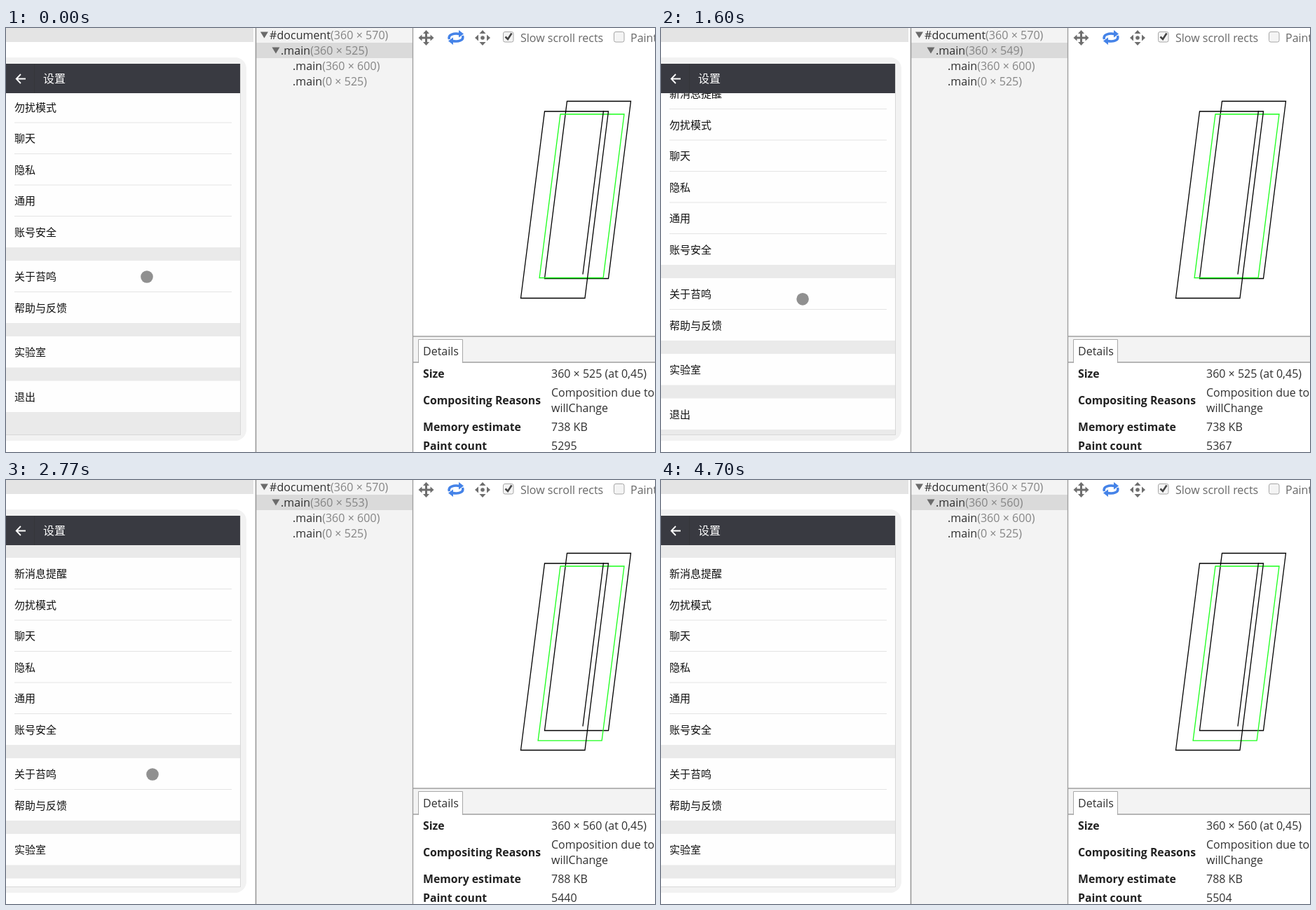
Recreate the animation shown at these times as an HTML page. Size 926 by 605 pixels, loop 5100 ms.

```html
<!DOCTYPE html>
<html lang="zh">
<head>
<meta charset="utf-8">
<title>Settings scroll and layer panel</title>
<style>
  html, body { margin: 0; width: 100%; height: 100%; overflow: hidden; background: #fff; }
  svg { display: block; }
  text { font: 16px "Open Sans", "Noto Sans", sans-serif; fill: #303030; white-space: pre; }
  .cjk text, text.cjk { font: 15px "Noto Sans CJK SC", "Noto Sans CJK", sans-serif; fill: #111; }
  text.title { font-size: 16px; fill: #fff; }
  .tree text { font-size: 16.1px; }
  .tree tspan { fill: #858585; }
  .tool text { fill: #686868; }
  .label text { font-size: 15.8px; font-weight: 700; fill: #222; }
  .layers { fill: none; stroke: #000; stroke-width: 1.3; }
</style>
</head>
<body>
<svg width="926" height="605" viewBox="0 0 926 605">
  <defs>
    <clipPath id="view"><rect y="93" width="334" height="487"/></clipPath>
    <path id="head" d="M0 -11L4.5 -6H-4.5Z"/>
  </defs>

  <!-- phone -->
  <rect width="353" height="20" fill="#e4e4e4"/>
  <rect x="-30" y="42" width="373" height="547" rx="16" fill="#f2f2f2"/>
  <rect y="51" width="335" height="530" fill="#d8d8d8"/>
  <rect y="93" width="334" height="487" fill="#eaeaea"/>
  <g clip-path="url(#view)"><g id="list" class="cjk"></g></g>
  <rect y="51" width="334" height="42" fill="#393a41"/>
  <path d="M40.5 51V93" stroke="#34353a"/>
  <path d="M28 72.5H15M21 66L14.7 72.5L21 79" fill="none" stroke="#fff" stroke-width="1.8"/>
  <text class="cjk title" x="53" y="78">设置</text>
  <circle id="finger" r="8.8" fill="#909090"/>

  <!-- layer tree -->
  <rect x="356" width="225" height="605" fill="#f3f3f3"/>
  <rect x="357" y="21" width="223" height="22" fill="#dadada"/>
  <path d="M356.5 0V605" stroke="#999" stroke-width="1.6"/>
  <path d="M363 5.500H374L368.500 14.500ZM379.500 27.500H390.500L385 36.500Z" fill="#6b6b6b"/>
  <g class="tree">
    <text x="376" y="15.5">#document<tspan>(360 × 570)</tspan></text>
    <text x="392" y="38">.main<tspan id="node"></tspan></text>
    <text x="409" y="60">.main<tspan>(360 × 600)</tspan></text>
    <text x="409" y="82">.main<tspan>(0 × 525)</tspan></text>
  </g>

  <!-- toolbar -->
  <rect x="581" width="345" height="440" fill="#fff"/>
  <g fill="#6e6e6e">
    <g transform="translate(599.500 14)">
      <path d="M-8 0H8M0 -8V8" stroke="#6e6e6e" stroke-width="3"/>
      <use href="#head"/><use href="#head" transform="rotate(90)"/>
      <use href="#head" transform="rotate(180)"/><use href="#head" transform="rotate(270)"/>
    </g>
    <g transform="translate(680 14)">
      <circle r="2.8"/>
      <use href="#head"/><use href="#head" transform="rotate(90)"/>
      <use href="#head" transform="rotate(180)"/><use href="#head" transform="rotate(270)"/>
    </g>
  </g>
  <g fill="none" stroke="#4583e8" stroke-width="3.500">
    <path d="M632.500 16C630 9 640 7 647 8.500M651.500 11C654 18 645 20 637 18.500"/>
    <path d="M646 3L653 8.500L646 13.500ZM638 13.500L631 18.500L638 24Z" fill="#4583e8" stroke="none"/>
  </g>
  <g fill="#f4f4f4" stroke="#a6a6a6">
    <rect x="709.5" y="5.500" width="14.500" height="14.500" rx="2.500"/>
    <rect x="867.5" y="5.500" width="14.500" height="14.500" rx="2.500"/>
    <path d="M712.500 12.500L716 16L721.500 7.500" fill="none" stroke="#444" stroke-width="2.500"/>
  </g>
  <g class="tool">
    <text x="734" y="19.500">Slow scroll rects</text>
    <text x="891" y="19.500">Paint</text>
  </g>

  <!-- layer outlines -->
  <g class="layers">
    <path d="M800.500 104.500H891.500L859.500 357.500H768.500Z"/>
    <path id="layer" stroke="#1aff1a"/>
    <path d="M768.500 119H859.500L826 385.500H734.500ZM852.500 118L823 351.500"/>
  </g>

  <!-- details -->
  <rect x="581" y="440" width="345" height="37" fill="#f3f3f3"/>
  <rect x="581" y="477" width="345" height="128" fill="#fff"/>
  <path d="M580.500 0V605M581 440H926M581 477H926" stroke="#a0a0a0" stroke-width="1.4"/>
  <path d="M588.500 478V444.500H651.500V478" fill="#fff" stroke="#a8a8a8"/>
  <text x="595" y="466.500">Details</text>
  <g class="label">
    <text x="595" y="499">Size</text>
    <text x="595" y="537">Compositing Reasons</text>
    <text x="595" y="575">Memory estimate</text>
    <text x="595" y="602">Paint count</text>
  </g>
  <text id="size" x="778" y="499"></text>
  <text x="778" y="526">Composition due to</text>
  <text x="778" y="548">willChange</text>
  <text id="memory" x="778" y="575"></text>
  <text id="paint" x="778" y="602"></text>
</svg>

<script>
const $ = id => document.getElementById(id);
const LOOP = 5100, SCALE = 0.93, ROW = 44.5, GAP = 19, TREE_LAG = 140;

const groups = [
  ["新消息提醒", "勿扰模式", "聊天", "隐私", "通用", "账号安全"],
  ["关于苔鸣", "帮助与反馈"], ["实验室"], ["退出"]
];

// drag bursts: start, end, number of picture changes
const bursts = [[60, 330, 6], [540, 1060, 11], [1370, 1810, 10], [1900, 2420, 10],
  [2470, 2770, 7], [2990, 3480, 11], [3790, 4310, 11]];

// time, scroll offset, finger x, finger y, paint count
const keys = [
  [0, -65, 201, 355, 5295], [60, -67, 201, 352, 5298], [114, -70, 201, 349, 5301],
  [330, -70, 201, 345, 5311], [540, -68, 201, 347, 5313], [900, 0, 201, 416, 5333],
  [1060, 0, 201, 432, 5341], [1370, 0, 201, 432, 5341], [1712, -70, 203, 353, 5386],
  [1810, -70, 204, 346, 5389], [1900, -70, 205, 347, 5391], [2304, -35, 208, 381, 5403],
  [2420, -15, 208, 401, 5410], [2470, -12, 208, 404, 5413], [2770, 0, 209, 420, 5440],
  [2990, -13, 209, 407, 5445], [3235, -53, 211, 365, 5460], [3333, -70, 211, 350, 5465],
  [3480, -70, 212, 347, 5479], [3790, -68, 212, 350, 5484], [3894, -38, 213, 381, 5490],
  [4100, 0, 213, 420, 5498], [4310, 0, 213, 430, 5504]
];

function buildList() {
  let y = 111, html = "";
  for (const names of groups) {
    html += `<rect y="${y}" width="334" height="${names.length * ROW}" fill="#fefefe"/>`;
    names.forEach((name, i) => {
      if (i) html += `<path d="M12 ${y}H322" stroke="#e4e4e4"/>`;
      html += `<text x="12" y="${y + 28.3}">${name}</text>`;
      y += ROW;
    });
    y += GAP;
  }
  $("list").innerHTML = html;
}

// the picture holds between the steps of a burst
function heldTime(t) {
  let held = 0;
  for (const [start, end, steps] of bursts) {
    if (t < start) break;
    const step = (end - start) / (steps - 1);
    held = t >= end ? end : start + Math.floor((t - start) / step) * step;
  }
  return held;
}

function poseAt(t) {
  const time = heldTime(t);
  let i = keys.findIndex(k => k[0] >= time);
  const b = keys[i], a = keys[Math.max(0, i - 1)];
  const p = b === a ? 0 : (time - a[0]) / (b[0] - a[0]);
  const [, offset, x, y, paint] = a.map((v, j) => v + (b[j] - v) * p);
  const over = offset <= -70 ? (y < 350 ? 2 : 1) : 0;
  const size = Math.max(525 + over, Math.floor(560 + offset / SCALE));
  return { offset, x, y, paint, over, size };
}

function draw(t) {
  const { offset, x, y, paint, over, size } = poseAt(t);
  $("list").setAttribute("transform", `translate(0 ${offset.toFixed(2)})`);
  $("finger").setAttribute("transform", `translate(${x} ${y})`);
  $("finger").style.display = t < 4310 ? "" : "none";

  const top = 123 - over * 0.44, bottom = 356.5 + (size - 525 - over) * 0.44;
  const edge = v => 791 - (v - 123) * 0.128;
  $("layer").setAttribute("d",
    `M${edge(top)} ${top}h91L${edge(bottom) + 91} ${bottom}h-91Z`);

  $("node").textContent = `(360 × ${poseAt(Math.max(0, t - TREE_LAG)).size})`;
  $("size").textContent = `360 × ${size} (at 0,${45 - over})`;
  $("memory").textContent = `${Math.round(size * 360 * 4 / 1024)} KB`;
  $("paint").textContent = Math.round(paint);
}

function tick() {
  draw(performance.now() % LOOP);
  requestAnimationFrame(tick);
}

buildList();
tick();
</script>
</body>
</html>
```
